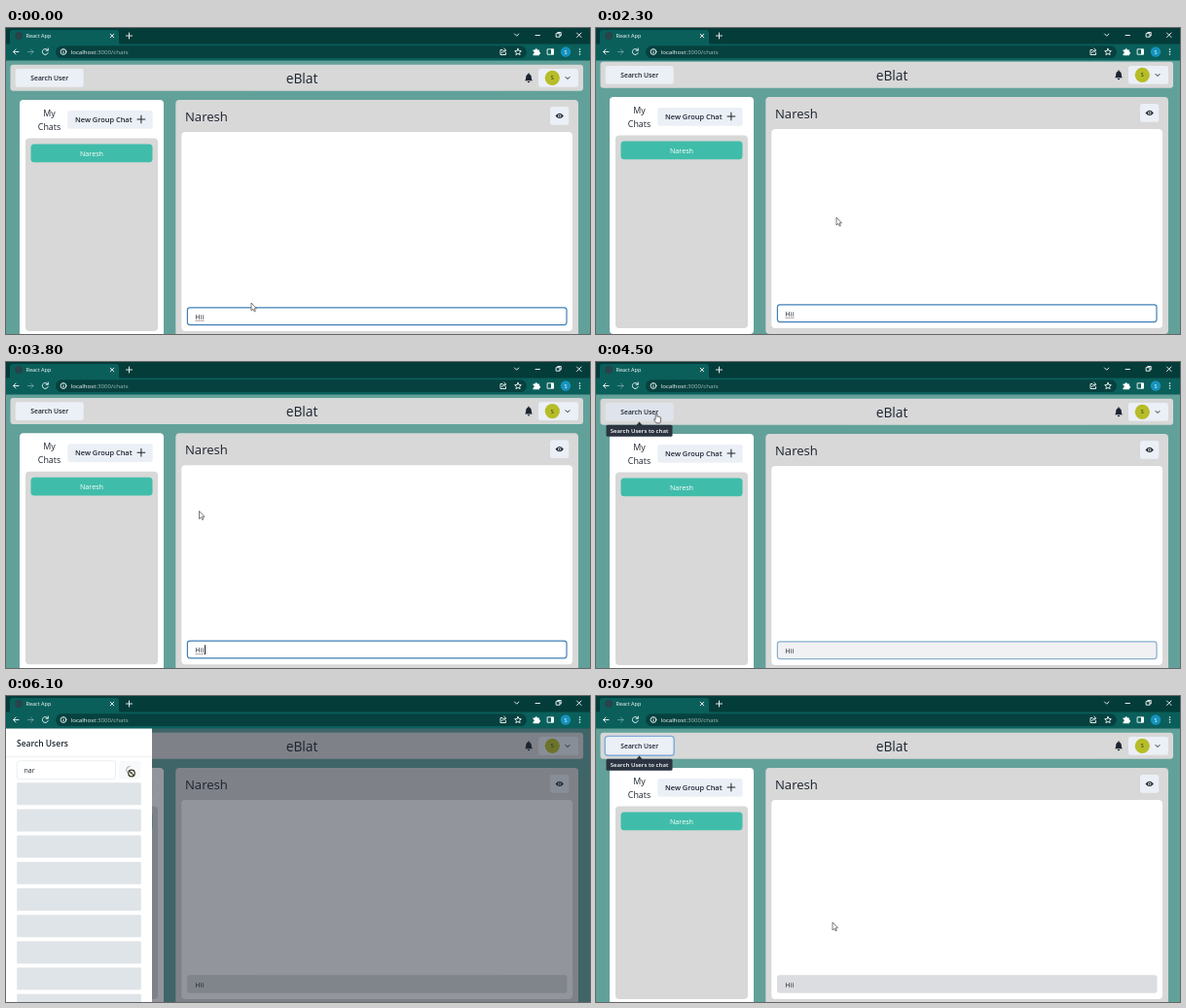
Write an HTML page that moves like this. It is 600 px wide and 315 px high and loops after 8 s.

```html
<!DOCTYPE html>
<html lang="en">
<head>
<meta charset="utf-8">
<title>Chat app</title>
<style>
html, body { margin: 0; width: 100%; height: 100%; overflow: hidden; }
svg { display: block; width: 600px; height: 315px; font-family: "Open Sans", "Noto Sans", sans-serif; fill: #1c2430; }
.mid { text-anchor: middle; }
.semi { font-weight: 600; }
.line { fill: none; stroke: #dfecea; stroke-width: 1; stroke-linecap: round; stroke-linejoin: round; }
.dark { stroke: #1c2430; }
.btn { fill: #ebeff6; }
.gray { fill: #d8d8d8; }
.white { fill: #fff; }
</style>
</head>
<body>
<svg viewBox="0 0 600 315">
  <rect width="600" height="315" fill="#62a19a"/>

  <g id="page">
    <rect class="gray" x="4.5" y="37.8" width="588.5" height="27" rx="3"/>
    <rect id="searchBtn" class="btn" x="9.7" y="42" width="70" height="18.7" rx="2.5"/>
    <rect id="ring" x="9.2" y="41.4" width="71" height="19.8" rx="3" fill="none" stroke="#7fabd9" stroke-width="1.4"/>
    <text class="mid semi" x="44.7" y="54" font-size="6.75">Search User</text>
    <text class="mid" x="304" y="57" font-size="13.8">eBlat</text>
    <path d="M533 54.3c1.2-1 1-2.400 1.200-4 .2-1.700 1.200-2.700 2.200-2.900v-.8h1.200v.8c1 .2 2 1.200 2.200 2.900.2 1.600 0 3 1.200 4zM535.800 55h2.400a1.200 1.200 0 0 1-2.400 0z"/>
    <rect class="btn" x="547" y="42" width="41" height="18.7" rx="2.5"/>
    <circle cx="561.3" cy="51.300" r="7.6" fill="#b6bd27"/>
    <text class="mid" x="561.3" y="53.300" font-size="5.400">S</text>
    <path class="line dark" d="M575 50.500l2 2 2-2"/>

    <rect class="white" x="14" y="74" width="148" height="244" rx="4"/>
    <text class="mid" x="44.500" y="90.500" font-size="8.9">My</text>
    <text class="mid" x="44.500" y="104.500" font-size="8.9">Chats</text>
    <rect class="btn" x="63.300" y="85" width="87.400" height="18.700" rx="2.500"/>
    <text class="semi" x="71" y="97" font-size="7.400">New Group Chat</text>
    <path class="line dark" d="M135 94h7.800M138.900 90.100v7.800"/>
    <rect class="gray" x="20" y="113.500" width="136" height="198.500" rx="4"/>
    <rect x="25.500" y="119.500" width="125" height="18.700" rx="3.500" fill="#40bdaa"/>
    <text class="mid white" x="88" y="131.500" font-size="7.200">Naresh</text>

    <rect class="gray" x="174.300" y="74" width="413.700" height="244" rx="4"/>
    <text x="184" y="96" font-size="13.100">Naresh</text>
    <rect class="btn" x="559" y="81" width="19.300" height="18.700" rx="2.500"/>
    <path d="M564.500 90.400q4.200-5.200 8.400 0q-4.200 5.200-8.400 0z"/>
    <circle cx="568.700" cy="90.400" r="1.700" class="white"/>
    <circle cx="568.700" cy="90.400" r="1"/>
    <rect class="white" x="180.300" y="107" width="401.700" height="205" rx="4"/>
    <rect id="msgFill" x="186" y="287.300" width="390.500" height="18.500" rx="2.500" fill="#dcdde0"/>
    <rect id="msgBorder" x="186.400" y="287.800" width="389.600" height="17.800" rx="2.500" fill="none" stroke="#3f80b8" stroke-width="1.200"/>
    <text x="194.300" y="299.500" font-size="7.200">Hii</text>
    <path id="spell" d="M194.500 301.400h9" stroke="#866" stroke-width=".8" stroke-dasharray="1.200 .4"/>
    <path id="msgCaret" class="line dark" stroke-width=".7" d="M204.500 292.500v9"/>
  </g>

  <g id="tip">
    <path d="M44.500 61.500l3.500 4h-7z" fill="#2b3440"/>
    <rect x="10.500" y="64.700" width="68" height="12" rx="1.500" fill="#2b3440"/>
    <text class="mid semi white" x="44.500" y="73" font-size="6.050">Search Users to chat</text>
  </g>

  <rect id="shade" y="33" width="600" height="282"/>

  <g id="drawer">
    <rect class="white" y="33" width="150" height="282"/>
    <text class="semi" x="11" y="51.500" font-size="8.500">Search Users</text>
    <path d="M0 62.500h150" stroke="#e6eaf0" stroke-width=".7"/>
    <rect id="field" class="white" x="11.300" y="66.700" width="101.200" height="18.800" rx="2.500"/>
    <text id="query" x="18.500" y="79" font-size="7"></text>
    <path id="caret" class="line dark" stroke-width=".8" d="M0 71.500v9"/>
    <rect id="goBtn" class="btn" x="116" y="66.700" width="22.500" height="18.800" rx="2.500"/>
    <text id="go" class="mid semi" x="127.200" y="79" font-size="7.300">Go</text>
    <path id="spinner" class="line" style="stroke:#a3a9b2" d="M127.200 72.500a3.600 3.600 0 1 0 3.600 3.600"/>
    <g id="bones"></g>
    <g id="card">
      <rect id="cardBg" x="11" y="89" width="128" height="23" rx="3"/>
      <circle cx="23" cy="100.500" r="7" fill="#b6bd27"/>
      <text class="mid" x="23" y="102.500" font-size="5.500">N</text>
      <text x="34" y="99" font-size="7">Naresh</text>
      <text x="34" y="107" font-size="5.200"><tspan class="semi">Email : </tspan>naresh@example.com</text>
    </g>
  </g>

  <g id="chrome">
    <rect width="600" height="17" fill="#043c3a"/>
    <path d="M2 17q2 0 2-3V5q0-3 3-3h106q3 0 3 3v9q0 3 2 3zM0 16.500h600v17H0z" fill="#0a5f5b"/>
    <circle cx="13.200" cy="8" r="4" fill="#29434a"/>
    <text class="white" x="20.500" y="10.300" font-size="5.500">React App</text>
    <path class="line" d="M107.200 6.200l3.600 3.600M110.800 6.200l-3.600 3.600M123.500 8h6M126.500 5v6"/>
    <path class="line" stroke-width=".8" d="M522.500 6l2.200 2.200 2.200-2.200M544 7.500h4.500M565.500 5.700h3.500v3.500h-3.500zM566.700 5.500v-1h3.500v3.500h-1M586.500 5l4.500 4.500M591 5l-4.500 4.500"/>
    <rect x="51" y="18.300" width="484" height="12.800" rx="6.400" fill="#06413f"/>
    <path class="line" d="M13 24.500H7.500M10 22l-2.500 2.500 2.500 2.500M43 23a3 3 0 1 0 .2 2.500M43.300 21v2.200h-2.200"/>
    <path class="line" opacity=".4" d="M22.500 24.500H28M25.500 22l2.500 2.500-2.500 2.500"/>
    <g class="line" stroke-width=".8">
      <circle cx="59" cy="24.500" r="2.900"/>
      <path d="M59 24.300v1.500M59 22.800v.1M510 22.500h-2v5h5.500v-2M509.500 25.500q.5-2.500 3.500-2.500M511.800 21.200l2 1.800-2 1.800"/>
      <path d="M526 21.300l1 2.200 2.300.2-1.700 1.600.5 2.300-2.100-1.200-2.100 1.200.5-2.300-1.700-1.600 2.300-.2z"/>
      <rect x="556.500" y="21.800" width="6" height="5.400"/>
    </g>
    <text x="66.700" y="26.700" font-size="6.150" fill="#a3bfbc"><tspan class="white">localhost</tspan>:3000/chats</text>
    <path class="white" d="M541.500 22.500h2a1.200 1.200 0 0 1 2.400 0h2v2a1.200 1.200 0 0 1 0 2.400v1.300h-6.400v-1.700a1.200 1.200 0 0 0 0-2.400zM560 21.800h2.500v5.400H560z"/>
    <circle cx="575" cy="24.500" r="5.200" fill="#1593bd"/>
    <text class="mid white" x="575" y="26.500" font-size="5.500">S</text>
    <g class="white"><circle cx="589.500" cy="22" r=".8"/><circle cx="589.500" cy="24.500" r=".8"/><circle cx="589.500" cy="27" r=".8"/></g>
  </g>

  <g id="cursor" stroke-linejoin="round">
    <path id="arrow" d="M0 0v8l1.900-1.700 1.300 2.700 1.200-.6-1.300-2.600h2.400z" fill="#fff" stroke="#444" stroke-width=".7"/>
    <path id="hand" d="M-.8 6.200V.6q0-.9.8-.9t.8.9v2.600q2-.3 3.800 1v2.500q0 1.700-1 3.200h-3.500l-2.700-3.500q-.2-1.200 1.800-.2z" fill="#fff" stroke="#333" stroke-width=".7"/>
    <g id="blocked" fill="none">
      <circle r="3.300" stroke="#fff" stroke-width="2.200"/>
      <path d="M-2.300-2.300l4.600 4.600M3.300 0a3.300 3.300 0 1 1-6.600 0a3.300 3.300 0 1 1 6.600 0" stroke="#38371c" stroke-width="1.200"/>
    </g>
  </g>
</svg>
<script>
const $ = id => document.getElementById(id);
const set = (id, attrs) => { for (const k in attrs) $(id).setAttribute(k, attrs[k]); };
const show = (id, on) => { $(id).style.display = on ? '' : 'none'; };
const within = (t, a, b) => t >= a && t < b;

// Linear interpolation through rows of [time, value, ...]
function track(rows, t) {
  let i = 0;
  while (i < rows.length - 2 && t >= rows[i + 1][0]) i++;
  const [a, b] = [rows[i], rows[i + 1]];
  const k = Math.min(1, Math.max(0, (t - a[0]) / (b[0] - a[0])));
  return a.slice(1).map((v, j) => v + (b[j + 1] - v) * k);
}

const pointer = [
  [0, 252, 283], [900, 252, 283], [1700, 247, 195], [3600, 247, 195],
  [4000, 150, 112], [4300, 62, 53], [4500, 62, 53], [4700, 57, 56], [5000, 57, 56],
  [5400, 120, 74], [5900, 129, 79], [6300, 129, 80], [6600, 118, 96],
  [7100, 303, 100], [7300, 303, 100], [7800, 243, 233], [8000, 243, 233]
];
const scroll = [[1900, 0], [2100, 3], [3000, 3], [3200, 1.5], [3700, 1.5], [3900, 0]];
const slide = [[4500, -150], [4600, -75], [4700, -8], [4800, 0], [7200, 0], [7300, -30], [7400, -110], [7500, -150]];
const dim = [[4500, 0], [4600, .3], [4700, .48], [7200, .48], [7300, .36], [7400, .15], [7500, 0]];
const focus = [[4400, 1], [4500, .6], [4600, 0]];

for (let i = 0; i < 9; i++) {
  $('bones').innerHTML += `<rect x="11.200" y="${89.200 + i * 27.200}" width="127.600" height="23" rx="1"/>`;
}

function draw(t) {
  const [x, y] = track(pointer, t);
  const [typing] = track(focus, t);
  const loading = within(t, 6000, 6200);
  const blink = t % 1060 >= 530;

  set('page', { transform: `translate(0 ${-track(scroll, t)[0]})` });
  set('searchBtn', { style: within(t, 4200, 4700) ? 'fill:#dfe4ec' : '' });
  show('ring', t >= 7400);
  show('tip', within(t, 4300, 4600) || t >= 7400);
  set('msgFill', { opacity: 1 - typing });
  set('msgBorder', { opacity: typing });
  show('spell', t < 4500);
  show('msgCaret', t < 4500 && blink);

  set('shade', { 'fill-opacity': track(dim, t)[0] });
  set('drawer', { transform: `translate(${track(slide, t)[0]} 0)` });
  show('drawer', within(t, 4600, 7500));

  const typed = 'nar'.slice(0, Math.max(0, Math.floor((t - 4900) / 200)));
  const active = t < 5900;
  $('query').textContent = typed || 'Search by name or email';
  set('query', { fill: typed ? '#1c2430' : '#7b8593' });
  set('field', { stroke: active ? '#3d88c9' : '#e2e8f0', 'stroke-width': active ? 1.3 : .7 });
  set('caret', { transform: `translate(${18.8 + typed.length * 3.7} 0)` });
  show('caret', active && (t - 4600) % 1060 < 530);

  set('goBtn', { opacity: loading ? .4 : 1 });
  show('go', !loading);
  show('spinner', loading);
  set('spinner', { transform: `rotate(${(t - 6100) * .8} 127.200 76.100)` });
  show('bones', loading);
  set('bones', { fill: t < 6100 ? '#e8ecf1' : '#dfe4e8' });
  show('card', t >= 6200);
  const hover = x > 11 && x < 139 && y > 89 && y < 112;
  set('cardBg', { fill: hover ? '#38b2ac' : '#e8e8e8' });

  const hand = within(t, 4200, 4600) || within(t, 5400, 6000) || (t >= 6200 && t < 7300 && hover);
  set('cursor', { transform: `translate(${x} ${y})` });
  show('hand', hand);
  show('blocked', loading);
  show('arrow', !hand && !loading);
}

function frame() {
  draw(Math.floor(performance.now() % 8000 / 100) * 100);
  requestAnimationFrame(frame);
}
frame();
</script>
</body>
</html>
```
